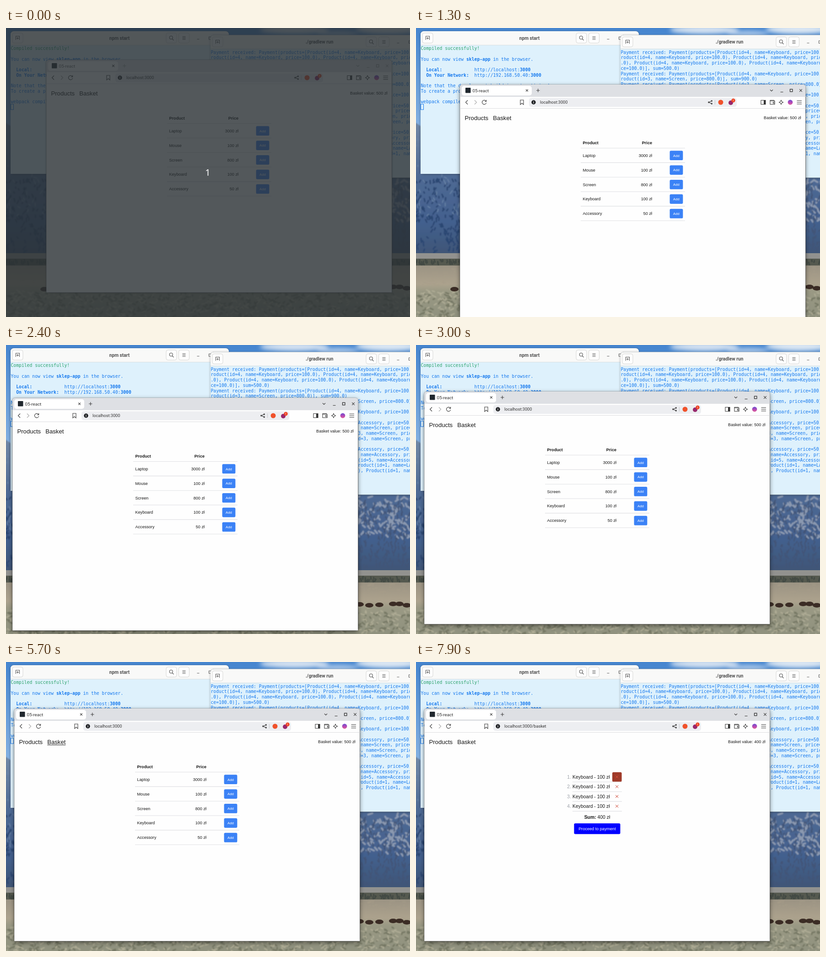
An HTML page for the animation above (8000 ms loop, 883 by 634 pixels).

```html
<!DOCTYPE html>
<html lang="en">
<head>
<meta charset="utf-8">
<title>Shop demo</title>
<style>
html, body { margin: 0; width: 100%; height: 100%; overflow: hidden; }
svg { display: block; width: 883px; height: 634px; }
text { white-space: pre; }
.mono { font: 9.72px "DejaVu Sans Mono", monospace; fill: #1478ee; }
.ui { font-family: Roboto, sans-serif; }
.page { font-family: "Liberation Sans", Arial, sans-serif; fill: #161616; }
.b { font-weight: bold; }
.end { text-anchor: end; }
.mid { text-anchor: middle; }
.ln { fill: none; stroke: #3c3c3c; stroke-width: 1.1; }
</style>
</head>
<body>
<svg id="stage" viewBox="0 0 883 634"></svg>
<script>
const LOOP = 8000, ROW = 31.85, ITEM = 21.45;

let seed = 7;
const rnd = () => {
  seed = (seed * 16807) % 2147483647;
  return seed / 2147483647;
};
const rect = (x, y, w, h, fill, r = 0, more = '') =>
  `<rect x="${x}" y="${y}" width="${w}" height="${h}" rx="${r}" fill="${fill}" ${more}/>`;
const circle = (x, y, r, fill) => `<circle cx="${x}" cy="${y}" r="${r}" fill="${fill}"/>`;
const ellipse = (x, y, rx, ry, fill) => `<ellipse cx="${x}" cy="${y}" rx="${rx}" ry="${ry}" fill="${fill}"/>`;
const text = (x, y, s, cls, size, more = '') =>
  `<text x="${x}" y="${y}" class="${cls}" ${size ? `font-size="${size}"` : ''} ${more}>${s}</text>`;
const line = (d, more = '') => `<path class="ln" d="${d}" ${more}/>`;
const cross = (x, y, r) => `M${x - r} ${y - r}l${2 * r} ${2 * r}m0 ${-2 * r}l${-2 * r} ${2 * r}`;
const gradient = (id, stops) =>
  `<linearGradient id="${id}" x2="0" y2="1">${stops.map(([o, c]) =>
    `<stop offset="${o}" stop-color="${c}"/>`).join('')}</linearGradient>`;

// Short strokes of random slope that roughen a flat area
function strokes(n, x, y, w, h, dx, dy, color, width) {
  let d = '';
  for (let i = 0; i < n; i++) {
    const sx = dx * (2 * rnd() - 1), sy = dy * (0.4 + rnd());
    d += `M${(x + rnd() * w).toFixed(1)} ${(y + rnd() * h).toFixed(1)}l${sx.toFixed(1)} ${sy.toFixed(1)}`;
  }
  return `<path d="${d}" fill="none" stroke="${color}" stroke-width="${width}" stroke-linecap="round"/>`;
}

function landscape() {
  const herd = [[84, 573], [738, 575], [773, 569], [794, 571], [816, 570], [846, 568], [860, 568], [876, 571]];
  return rect(0, 0, 883, 330, 'url(#sky)') +
    `<g filter="url(#soft)">` +
    ellipse(630, 4, 75, 9, '#d5e2f1') + ellipse(725, 12, 45, 6, '#a9c6e8') + ellipse(835, 3, 70, 10, '#dce7f3') + `</g>` +
    `<g filter="url(#haze)">` +
    `<path d="M-5 205L40 235L90 250L400 300L890 300V500H-5Z" fill="url(#hill)"/>` +
    strokes(120, 745, 330, 140, 90, 9, 5, '#8b99b0', 4) +
    strokes(170, 0, 330, 100, 160, 4, 5, '#2c4672', 3) +
    strokes(60, 0, 215, 100, 200, 5, 5, '#6883a6', 2) +
    strokes(260, 745, 340, 140, 145, 3, 6, '#425577', 2.5) + `</g>` +
    rect(0, 494, 883, 12, '#92928f') +
    rect(0, 506, 883, 16, '#55594f') +
    strokes(300, 0, 508, 883, 8, 2, 5, '#434a44', 3) +
    rect(0, 521, 883, 113, 'url(#plain)') +
    `<g filter="url(#haze)">` +
    strokes(200, 0, 524, 883, 40, 14, 0.5, '#a79d89', 1.5) +
    strokes(450, 0, 580, 883, 52, 8, 3, '#757763', 3) +
    strokes(400, 0, 574, 883, 60, 8, 3, '#b0ad96', 2.5) + `</g>` +
    herd.map(([x, y]) => ellipse(x, y, 9, 5, '#3b2c25')).join('');
}

function terminal(x, y, title, body) {
  const box = (cx, icon) =>
    rect(cx - 11.5, 4, 23, 22, '#fdfdfd', 4, 'stroke="#d6d6d4"') + line(icon, 'style="stroke:#555"');
  return `<g transform="translate(${x} ${y})">` +
    rect(0, 0, 477, 313, '#000', 7, 'filter="url(#dim)"') +
    `<path d="M0 313V8Q0 0 8 0H469Q477 0 477 8V313Z" fill="#def1fc"/>` +
    `<path d="M0 30V8Q0 0 8 0H469Q477 0 477 8V30Z" fill="#f9f9f8"/>` +
    line('M0 30.5H477', 'style="stroke:#d9dfe2"') +
    box(15.5, 'M11.5 19v-8h8v8M15.5 13v5M13 15.5h5') +
    box(351.5, 'M353.5 17l3 3M354.3 14a3.5 3.5 0 1 1-7 0a3.5 3.5 0 1 1 7 0') +
    box(379, 'M375.5 12h7m-7 3h7m-7 3h7') +
    line('M407.5 17.5h5M433.5 12.5h5.5v5.5h-5.5z', 'style="stroke:#666"') +
    text(238, 18.6, title, 'ui b mid', 10.2, 'fill="#505050"') +
    body.map((s, i) => text(0.5, 41.2 + i * 11.7, s, 'mono')).join('') + `</g>`;
}

function npmLog() {
  const b = s => `<tspan class="b">${s}</tspan>`;
  return [
    '<tspan fill="#2ba36b">Compiled successfully!</tspan>', '',
    `You can now view ${b('sklep-app')} in the browser.`, '',
    `  ${b('Local:')}            http://localhost:${b('3000')}`,
    `  ${b('On Your Network:')}  http://192.168.50.40:${b('3000')}`, '',
    'Note that the development build is not optimized.',
    'To create a production build, use npm run build.', '',
    'webpack compiled successfully'
  ];
}

const goods = [['Laptop', 3000], ['Mouse', 100], ['Screen', 800], ['Keyboard', 100], ['Accessory', 50]];

// Each payment is a list of product ids; the log wraps at 80 columns
function paymentLog() {
  const payments = ['44444', '43', '3', '4', '5533333', '555555111'];
  return payments.flatMap(ids => {
    const list = [...ids].map(id => [id, ...goods[id - 1]]);
    const sum = list.reduce((s, p) => s + p[2], 0);
    const items = list.map(([id, name, price]) => `Product(id=${id}, name=${name}, price=${price}.0)`);
    return `Payment received: Payment(products=[${items.join(', ')}], sum=${sum}.0)`.match(/.{1,80}/g);
  });
}

function chrome() {
  return rect(0, 0, 755.5, 510.5, '#000', 6, 'id="shade"') +
    `<path d="M0 510.5V6Q0 0 6 0H749.5Q755.5 0 755.5 6V510.5Z" fill="#fefefe" stroke="#000" stroke-opacity=".4" stroke-width=".8"/>` +
    `<path id="strip" d="M0 27V6Q0 0 6 0H749.5Q755.5 0 755.5 6V27Z"/>` +
    rect(4, 3, 153, 21, '#fff', 5) +
    rect(12, 7, 11.5, 11.5, '#20272e', 1) +
    text(27.5, 16.6, '05-react', 'ui', 9.8, 'id="tab"') +
    line(cross(146.5, 13, 2.4)) +
    `<g id="controls">` +
    line('M167 13h7.5m-3.75 -3.75v7.5') + line('M678 11.5l3 3l3 -3') +
    line('M700.5 16.5h6', 'stroke-width="1.4"') + rect(721.5, 10.3, 5.4, 5.4, 'none', 0, 'stroke="#333" stroke-width="1.3"') +
    line(cross(745, 13, 2.8)) + `</g>` +
    line('M0 52.5H755.5', 'style="stroke:#dcdde0"') +
    line('M17 34.5l-4.5 4.5l4.5 4.5') + line('M32 34.5l4.5 4.5l-4.5 4.5', 'style="stroke:#aaa"') +
    line('M57 36.5a4.6 4.6 0 1 0 .6 3.5M57.6 33.8v3.4h-3.4') +
    line('M132 34h7v10l-3.5 -3l-3.5 3z') +
    rect(151, 29.5, 454, 19.5, '#edeef1', 5) +
    circle(161, 39, 4.7, '#1d1f22') + rect(160.4, 38.2, 1.2, 3.3, '#fff') + rect(160.4, 36.2, 1.2, 1.2, '#fff') +
    text(175, 42.4, '', 'ui', 9.2, 'id="url" fill="#333"') +
    line('M550 36l-6 3l6 3') + circle(550.3, 36, 1.7, '#444') + circle(543.8, 39, 1.7, '#444') + circle(550.3, 42, 1.7, '#444') +
    line('M557.5 34v10', 'style="stroke:#c8cacf"') +
    circle(570, 39, 5.5, '#f0522b') + circle(592, 40, 5, '#98286b') +
    circle(597.5, 35, 4.2, '#ee4424') + text(597.5, 37.2, '1', 'ui mid', 6, 'fill="#fff"') +
    line('M658 34.5h10v9h-10z') + rect(664, 34.5, 4, 9, '#333') +
    line('M678 36v-1.5h8.5v2M678 36h10v7.5h-10zM688 38.5h-3.5v2.6h3.5') +
    line('M702 33.8q.6 4.6 5 5.2q-4.4 .6 -5 5.2q-.6 -4.6 -5 -5.2q4.4 -.6 5 -5.2z') +
    circle(722, 39, 5.4, 'url(#face)') +
    line('M736.5 35.2h10.5m-10.5 3.8h10.5m-10.5 3.8h10.5');
}

function shop() {
  const rule = y => line(`M264 ${y}H492`, 'style="stroke:#dfe0e3"');
  return text(268.5, 131, 'Product', 'page b', 9.1) + text(420, 131, 'Price', 'page b end', 9.1) + rule(139.5) +
    goods.map(([name, price], i) => {
      const y = i * ROW;
      return text(268.5, 158.8 + y, name, 'page', 9.1) + text(420, 158.8 + y, price + ' zł', 'page end', 9.1) +
        rect(458.6, 145.3 + y, 28.8, 20.8, '#3b82f6', 2.6) +
        text(473, 158.5 + y, 'Add', 'page mid', 7.8, 'style="fill:#fff"') + rule(139.5 + ROW + y);
    }).join('');
}

function basket() {
  let s = '';
  for (let i = 0; i < 5; i++) {
    s += `<g class="item" transform="translate(0 ${i * ITEM})">` +
      text(321, 3.7, i + 1 + '.', 'page end', 10.4, 'style="fill:#9ca0a8"') +
      text(324, 3.7, 'Keyboard - 100 zł', 'page', 10.4) +
      line('M324 11H432', 'style="stroke:#dfe0e3"') +
      rect(411, -10.3, 20.6, 20.8, '#9f3a29', 2.6, 'class="hot"') +
      `<path class="x" d="${cross(421.2, 0, 3)}" fill="none" stroke-width="1"/></g>`;
  }
  return s + `<g id="foot">` +
    text(378, 6.4, '<tspan class="b">Sum:</tspan> <tspan id="sum"></tspan> zł', 'page mid', 10.4) +
    rect(331, 39.4, 94, 1.2, '#777', 0, 'id="lift"') +
    rect(327.5, 16.2, 101, 23.4, '#0000ff', 2.6) +
    text(378, 31.1, 'Proceed to payment', 'page mid', 9.1, 'style="fill:#fff"') + `</g>`;
}

const $ = id => document.getElementById(id);
const all = cls => [...document.getElementsByClassName(cls)];
const shadow = (id, dy, dev, a) =>
  `<filter id="${id}" x="-10%" y="-10%" width="120%" height="120%"><feDropShadow dx="0" dy="${dy}" stdDeviation="${dev}" flood-opacity="${a}"/></filter>`;
const blur = (id, dev) =>
  `<filter id="${id}" x="-20%" y="-150%" width="140%" height="400%"><feGaussianBlur stdDeviation="${dev}"/></filter>`;

$('stage').innerHTML = `<defs>` +
  gradient('sky', [[0, '#4585cf'], [0.6, '#7fade0'], [1, '#a5c0df']]) +
  gradient('hill', [[0, '#7389a6'], [0.4, '#4f6a94'], [0.75, '#43608e'], [1, '#3f5575']]) +
  gradient('plain', [[0, '#9b9383'], [0.36, '#aca28d'], [0.5, '#9a9984'], [1, '#8f917e']]) +
  gradient('face', [[0, '#6a4fd0'], [0.5, '#b048b8'], [1, '#e0609a']]) +
  shadow('dim', 1, 2.5, 0.3) + shadow('lit', 3, 5, 0.5) + blur('soft', 5) + blur('haze', 0.9) + `</defs>` +
  landscape() +
  terminal(10, 7, 'npm start', npmLog()) +
  rect(10.5, 167, 6, 12, 'none', 0, 'stroke="#1478ee"') +
  terminal(447, 15.5, './gradlew run', paymentLog()) +
  `<g id="browser">` + chrome() +
  text(10.5, 77.6, 'Products', 'page', 13.1) + text(72.3, 77.6, 'Basket', 'page', 13.1) +
  rect(10.3, 79.4, 51.7, 1.3, '#555', 0, 'id="under1"') + rect(72.3, 79.4, 40, 1.3, '#555', 0, 'id="under2"') +
  text(745.5, 76.1, '', 'page end', 9.1, 'id="value"') +
  `<g id="shop">${shop()}</g><g id="basket">${basket()}</g></g>` +
  `<g id="count">${rect(0, 0, 883, 634, 'rgba(40,47,50,.8)')}` +
  text(441, 324, '1', 'mid', 20, 'fill="#fff" font-family="Noto Sans, sans-serif"') + `</g>`;

const drag = [
  [0, 88, 70], [900, 76, 87], [1100, 82, 105], [1200, 90, 118], [1300, 96, 124],
  [1700, 60, 96], [1800, 20, 70], [2000, -4, 111], [2100, 4, 117], [2300, 12, 120],
  [2400, 14, 116], [2500, 15, 111], [2700, 16, 106], [2800, 19, 103], [3000, 18, 102]
];
const show = (el, on) => el.setAttribute('visibility', on ? 'inherit' : 'hidden');
const within = (t, a, b) => t >= a && t < b;

function update(t) {
  const [, x, y] = drag.findLast(p => t >= p[0]);
  const focused = t >= 900, inBasket = t >= 6400;
  const n = t >= 7900 ? 4 : 5;

  $('browser').setAttribute('transform', `translate(${x} ${y})`);
  $('shade').setAttribute('filter', focused ? 'url(#lit)' : 'url(#dim)');
  $('strip').setAttribute('fill', focused ? '#dee0e4' : '#e3e4e7');
  $('tab').setAttribute('fill', focused ? '#333' : '#666');
  $('controls').setAttribute('opacity', focused ? 1 : 0.4);
  show($('count'), t < 100);

  show($('under1'), within(t, 3800, 4500));
  show($('under2'), within(t, 5700, 5800) || within(t, 6000, 6700));
  $('url').textContent = 'localhost:3000' + (inBasket ? '/basket' : '');
  $('value').textContent = `Basket value: ${n * 100} zł`;
  show($('shop'), !inBasket);
  show($('basket'), inBasket);

  // The list stays centred while it shrinks
  $('basket').setAttribute('transform', `translate(0 ${150 - (n - 4) * ITEM / 2})`);
  $('foot').setAttribute('transform', `translate(0 ${n * ITEM})`);
  $('sum').textContent = n * 100;
  show($('lift'), inBasket && within(t, 6900, 7200));
  $('lift').setAttribute('opacity', within(t, 7000, 7100) ? 0.8 : 0.4);

  // The pointer climbs from the last remove button to the first
  const hot = t < 7200 ? -1 : Math.max(0, 4 - Math.floor((t - 7200) / 100));
  all('item').forEach((el, i) => show(el, inBasket && i < n));
  all('hot').forEach((el, i) =>
    el.setAttribute('opacity', i !== hot ? 0 : within(t, 7600, 7700) ? 0.7 : 1));
  all('x').forEach((el, i) => el.setAttribute('stroke', i === hot ? '#e2543f' : '#cb3522'));
}

let last = -1;
function tick() {
  const t = Math.floor(performance.now() % LOOP / 100) * 100;
  if (t !== last) update(last = t);
  requestAnimationFrame(tick);
}
tick();
</script>
</body>
</html>
```
